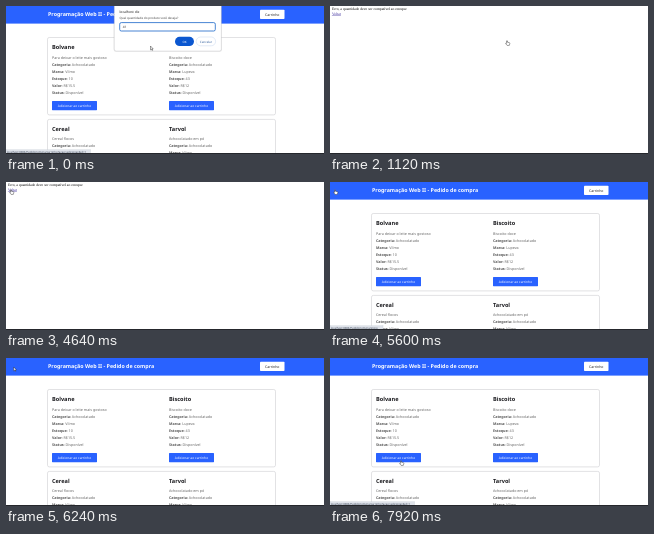
Write an HTML page that moves like this. It is 318 px wide and 148 px high and loops after 8000 ms.

```html
<!DOCTYPE html>
<html lang="pt-BR">
<head>
<meta charset="utf-8">
<title>Pedido de compra</title>
<style>
  html, body { margin: 0; width: 100%; height: 100%; overflow: hidden; background: #fff; }
  svg { display: block; width: 100vw; height: 100vh; }
  text { font-family: "Noto Sans", "Open Sans", sans-serif; text-rendering: geometricPrecision; white-space: pre; }
  .serif { font-family: "Liberation Serif", "Noto Serif", serif; }
  .b { font-weight: 700; }
</style>
</head>
<body>
<svg id="stage" viewBox="0 0 318 148"></svg>
<script>
const NS = "http://www.w3.org/2000/svg";
const stage = document.getElementById("stage");
const BLUE = "#2962ff";

function add(parent, tag, attrs = {}, content) {
  const el = document.createElementNS(NS, tag);
  for (const key in attrs) el.setAttribute(key, attrs[key]);
  if (content !== undefined) el.textContent = content;
  return parent.appendChild(el);
}
const group = () => add(stage, "g");
const rect = (g, x, y, width, height, fill, more) =>
  add(g, "rect", { x, y, width, height, fill, ...more });
const label = (g, x, y, size, fill, str, more) =>
  add(g, "text", { x, y, "font-size": size, fill, ...more }, str);
const centered = { "text-anchor": "middle" };

function product(g, x, y, name, about, rows) {
  label(g, x, y + 11.2, 5.6, "#1b1b1f", name, { class: "b" });
  label(g, x, y + 20.8, 3.66, "#666", about);
  rows.forEach(([key, value], i) => {
    const line = label(g, x, y + 27.9 + i * 7.05, 3.66, "#666", "");
    add(line, "tspan", { class: "b", fill: "#555" }, key + ": ");
    add(line, "tspan", {}, value);
  });
  rect(g, x, y + 63.2, 45, 9.3, BLUE, { rx: 0.6 });
  label(g, x + 22.5, y + 69.1, 3.3, "#fff", "Adicionar ao carrinho", centered);
}

const details = (brand, stock, price) => [
  ["Categoria", "Achocolatado"], ["Marca", brand], ["Estoque", stock],
  ["Valor", price], ["Status", "Disponível"]
];

// Shop page
const shop = group();
rect(shop, 0, 0, 318, 148, "#fff");
rect(shop, 0, 0, 318, 17.6, BLUE);
label(shop, 42, 9.9, 5.33, "#fff", "Programação Web II - Pedido de compra", { class: "b" });
rect(shop, 254, 3.7, 24.5, 9.3, "#fff", { rx: 0.8 });
label(shop, 266.3, 9.5, 3.5, "#222", "Carrinho", centered);
for (const y of [31.5, 113.4])
  rect(shop, 41.5, y, 228, 77.4, "#fff", { rx: 1.8, stroke: "#c4c4c8", "stroke-width": 0.5 });
product(shop, 46, 31.7, "Bolvane", "Para deixar o leite mais gostoso", details("Vilmo", "10", "R$15.5"));
product(shop, 163, 31.7, "Biscoito", "Biscoito doce", details("Lupeva", "43", "R$12"));
product(shop, 46, 113.5, "Cereal", "Cereal flocos", details("Vilmo", "20", "R$10"));
product(shop, 163, 113.5, "Tarvol", "Achocolatado em pó", details("Vilmo", "12", "R$9"));

// Error page
const error = group();
rect(error, 0, 0, 318, 148, "#fff");
label(error, 1.9, 4.2, 3.72, "#000", "Erro, a quantidade deve ser compatível ao estoque", { class: "serif" });
label(error, 1.9, 8.5, 3.72, "#3a2a9c", "Voltar", { class: "serif", "text-decoration": "underline" });

// Prompt
const prompt = group();
rect(prompt, 107.6, -5, 108.4, 50.8, "#000", { rx: 2.2, opacity: 0.1 });
rect(prompt, 108.3, -5, 107, 50, "#fff", { rx: 1.9, stroke: "#c8c8cc", "stroke-width": 0.4 });
label(prompt, 113.5, 6.6, 3.4, "#222", "localhost diz");
label(prompt, 113.5, 13.4, 3, "#444", "Qual quantidade do produto você deseja?");
rect(prompt, 113.7, 16.6, 95.6, 8.4, "#fff", { rx: 1.6, stroke: "#1a66c8", "stroke-width": 0.8 });
label(prompt, 116.8, 22.1, 3.2, "#222", "41");
const ok = rect(prompt, 169, 30.8, 19, 9.2, "#0b57d0", { rx: 4.6 });
label(prompt, 178.5, 36.6, 3, "#fff", "OK", centered);
rect(prompt, 190.2, 31, 19.4, 8.8, "#fff", { rx: 4.4, stroke: "#b9cdea", "stroke-width": 0.4 });
label(prompt, 199.9, 36.5, 3, "#33609f", "Cancelar", centered);

// Link address shown in the bottom corner
function statusBar(width, str) {
  const g = group();
  rect(g, 0, 143.8, width, 3.6, "#dfe3ea", { stroke: "#bcc2cc", "stroke-width": 0.3 });
  label(g, 0.8, 146.7, 2.75, "#3c4658", str);
  return g;
}
const addLink = statusBar(84.5, "localhost:8080/PedidoCompra/carrinho?acao=adicionar&id=1");
const backLink = statusBar(53, "localhost:8080/PedidoCompra/inicio");
rect(stage, 0, 147, 318, 1, "#25272c");

// Pointer shapes, hot spot at 0,0
const pointer = group();
const ink = { fill: "#fff", stroke: "#111", "stroke-width": 0.4, "stroke-linejoin": "round" };
const arrow = add(pointer, "path", { d: "M0 0V3.9L.9 3.1 1.5 4.5 2.1 4.2 1.5 2.9H2.7Z", ...ink });
const hand = add(pointer, "path", {
  d: "M-.4 .3Q0-.3 .4 .3V1.7L2.5 2.2Q3 2.4 2.8 3.2L2.3 4.9H.1L-1.4 3Q-1.4 2.3-.4 2.8Z", ...ink
});

// time, x, y
const path = [
  [0, 144.5, 40], [80, 144.5, 40], [880, 177, 34.5], [3120, 177, 34.5],
  [3200, 174.5, 34.3], [3440, 174.5, 34.3], [3680, 80.3, 14.3], [3840, 80.3, 14.3],
  [4560, 5, 7.5], [5600, 5, 7.5], [6160, 6, 7.5], [6960, 66.5, 61],
  [7040, 67, 63], [7840, 71, 102.5]
];
const LOOP = 8000, STEP = 80;
const ease = k => k * k * (3 - 2 * k);

function place(t) {
  const i = path.findIndex(p => p[0] > t);
  if (i < 0) return path[path.length - 1].slice(1);
  const [t0, x0, y0] = path[i - 1], [t1, x1, y1] = path[i];
  const k = ease((t - t0) / (t1 - t0));
  return [x0 + (x1 - x0) * k, y0 + (y1 - y0) * k];
}

const within = (t, ...spans) => spans.some(([a, b]) => t >= a && t < b);
const show = (el, on) => el.setAttribute("visibility", on ? "visible" : "hidden");

function draw(now) {
  const t = Math.floor((now % LOOP) / STEP) * STEP;
  const onError = within(t, [1120, 5600]);
  show(shop, !onError);
  show(error, onError);
  show(prompt, t < 1040);
  ok.setAttribute("fill", within(t, [800, 1040]) ? "#2f70d8" : "#0b57d0");
  show(addLink, within(t, [0, 480], [7680, LOOP]));
  show(backLink, within(t, [4720, 6000]));
  const onLink = within(t, [800, 3200], [4480, 6000], [7600, LOOP]);
  show(hand, onLink);
  show(arrow, !onLink);
  pointer.setAttribute("transform", `translate(${place(t)})`);
}

const start = performance.now();
function tick() {
  draw(performance.now() - start);
  requestAnimationFrame(tick);
}
tick();
</script>
</body>
</html>
```
